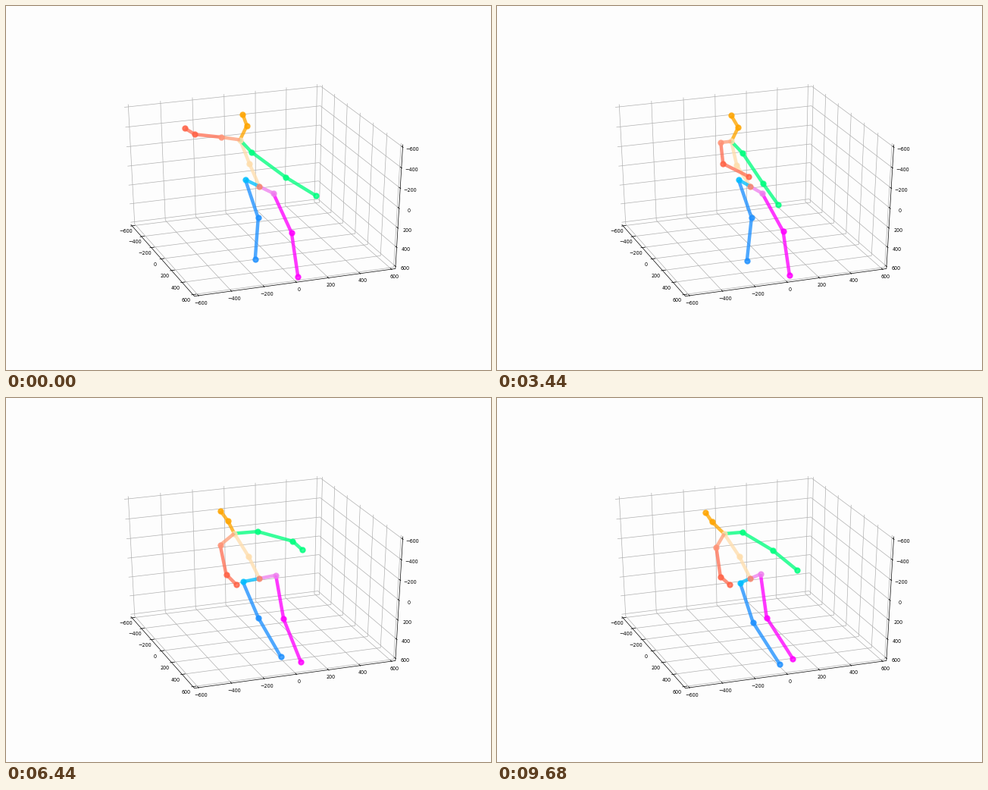
A matplotlib script for the animation above (9720 ms loop, 640 by 480 pixels).

```python
import numpy as np
import matplotlib.pyplot as plt
from matplotlib.animation import FuncAnimation
from matplotlib.collections import LineCollection

W, H = 640, 480
FRAMES, STEP = 243, 40
TICKS = range(-600, 601, 200)
EDGE = 625          # walls stand a little outside the ticks
PAD = 42            # distance of labels from their axis
ROOT = np.array([334.3, 238.0])

fig = plt.figure(figsize=(W / 100, H / 100), dpi=100, facecolor="#fdfdfd")
ax = fig.add_axes([0, 0, 1, 1])
ax.set_xlim(0, W)
ax.set_ylim(H, 0)
ax.axis("off")


# ---- room -------------------------------------------------------------

AZIM, ELEV = np.radians([-20, 30])


def project(x, y, z):
    """Perspective view of a data point, in stage pixels; z points down."""
    x, y, z = x / 1200, y / 1200, -z / 1200
    right = y * np.cos(AZIM) - x * np.sin(AZIM)
    near = x * np.cos(AZIM) + y * np.sin(AZIM)
    up = z * np.cos(ELEV) - near * np.sin(ELEV)
    dist = 10 - near * np.cos(ELEV) - z * np.sin(ELEV)
    return 334.7 + 2681 * right / dist, 238.2 - 1782 * up / dist


def path(*points):
    return [project(*p) for p in points]


def label(value, *point):
    x, y = project(*point)
    ax.text(x, y + 1, str(value).replace("-", "\u2212"), fontsize=4.7,
            family="DejaVu Sans", ha="center", va="center", color="black")


def draw_room():
    e, out, inn, far = EDGE, EDGE + 10, EDGE - 20, EDGE + PAD
    grid, marks = [], []
    for v in TICKS:
        grid += [path((v, -e, e), (v, e, e), (v, e, -e)),
                 path((e, v, e), (-e, v, e), (-e, v, -e)),
                 path((-e, -e, v), (-e, e, v), (e, e, v))]
        marks += [path((v, -out, e), (v, -inn, e)),
                  path((out, v, e), (inn, v, e)),
                  path((out, e, v), (inn, e, v))]
        label(v, v, -far, far)
        label(v, far, v, far)
        label(v, far, far, v)
    marks.append(path((-e, -e, e), (e, -e, e), (e, e, e), (e, e, -e)))
    for lines, color in ((grid, "#b0b0b0"), (marks, "black")):
        ax.add_collection(LineCollection(lines, colors=color, linewidths=0.5,
                                         zorder=1))


# ---- motion -----------------------------------------------------------

# The body turns once from its first stance to its last; the right arm
# swings in earlier. Around that, soft pulses (centre, width in s) move limbs.
TURN, SWING = (3.6, 7.4), (1.3, 3.6)
PULSES = dict(reach=(1.0, 0.8), cross=(3.4, 0.9), stride=(5.4, 1.0),
              lift=(7.4, 1.0), settle=(9.7, 0.8))


def smooth(t, start, end):
    u = np.clip((t - start) / (end - start), 0, 1)
    return u * u * (3 - 2 * u)


def bone(start, end, when=TURN, **pulses):
    """Offset of a joint from its parent as a function of time."""
    start, end = np.array(start), np.array(end)

    def offset(t):
        total = start + (end - start) * smooth(t, *when)
        for name, push in pulses.items():
            centre, width = PULSES[name]
            total = total + np.array(push) * np.exp(-((t - centre) / width) ** 2)
        return total
    return offset


hip = bone((-18.5, -9), (-20, 6.8),
           cross=(3, 0), stride=(-6, 0), settle=(6.5, -1))

# joint: parent, bone colour, dot colour, offset
SKELETON = {
    "spine": ("root", "navajowhite", "navajowhite", bone(
        (-13, -30), (-14.5, -29), cross=(-5, 2))),
    "chest": ("spine", "navajowhite", "navajowhite", bone(
        (-12.5, -31.5), (-20, -30), cross=(5.5, 0))),
    "nose": ("chest", "orange", "orange", bone(
        (9, -18.5), (-12, -16.5), settle=(-4, 1))),
    "head": ("nose", "orange", "orange", bone(
        (-5.5, -15.5), (-8.5, -12.5), cross=(-3.5, 0), stride=(-5, 0))),

    "hip_r": ("root", "deepskyblue", "deepskyblue", hip),
    "knee_r": ("hip_r", "dodgerblue", "dodgerblue", bone(
        (17, 50.5), (17, 52), stride=(10, -13))),
    "foot_r": ("knee_r", "dodgerblue", "dodgerblue", bone(
        (-4, 54), (31, 56), cross=(-2, 3), stride=(-4, -7), lift=(14, -5),
        settle=(4, -1))),

    "hip_l": ("root", "violet", "violet", lambda t: -hip(t)),
    "knee_l": ("hip_l", "magenta", "magenta", bone(
        (24, 52), (6, 59.5), cross=(3.5, -2), stride=(4, -2),
        settle=(2, -2))),
    "foot_l": ("knee_l", "magenta", "magenta", bone(
        (8.5, 58), (25.5, 55), stride=(0, 4), settle=(9, -1))),

    "shoulder_l": ("chest", "springgreen", "springgreen", bone(
        (15, 16), (31, -6), stride=(7, 0), settle=(-7, 4))),
    "elbow_l": ("shoulder_l", "springgreen", "springgreen", bone(
        (43, 33), (45, 22), reach=(9, 0), cross=(-17, 6), stride=(5, 4),
        lift=(0, -31), settle=(-5, 2))),
    "hand_l": ("elbow_l", "springgreen", "springgreen", bone(
        (37, 25), (16, 16), reach=(14, -3), cross=(-17, 3),
        lift=(-18, -16), settle=(16, 10))),

    "shoulder_r": ("chest", "lightsalmon", "#ff9478", bone(
        (-24.5, -3.5), (-17.5, 19), cross=(10.5, 5), settle=(7, -1))),
    "elbow_r": ("shoulder_r", "#ff7256", "tomato", bone(
        (-33, -3.5), (5.5, 38.5), SWING, reach=(-9, -1), cross=(-2, -10),
        lift=(6, 0))),
    "hand_r": ("elbow_r", "#ff7256", "tomato", bone(
        (-11, -8), (7, 14.5), SWING, reach=(-12, 0), cross=(27, 3),
        stride=(15, -8), lift=(3, 4), settle=(5, -4))),
}


def pose(t):
    points = {"root": ROOT}
    for name, (parent, _, _, offset) in SKELETON.items():
        points[name] = points[parent] + offset(t)
    return points


# ---- figure -----------------------------------------------------------

def make_dot(color, z):
    return ax.plot([], [], "o", color=color, ms=4.5, mew=1.5, alpha=0.8,
                   zorder=z)[0]


draw_room()
lines, dots = {}, {"root": make_dot("#f5866e", 2.6)}
for name, (_, color, dot_color, _) in SKELETON.items():
    z = 3 if name in ("shoulder_r", "elbow_r", "hand_r") else 2
    lines[name], = ax.plot([], [], color=color, lw=3.2, alpha=0.78, zorder=z,
                           solid_capstyle="butt")
    dots[name] = make_dot(dot_color, z + 0.5)


def update(i):
    points = pose(i * STEP / 1000)
    for name, line in lines.items():
        line.set_data(*zip(points[SKELETON[name][0]], points[name]))
    for name, dot in dots.items():
        x, y = points[name]
        dot.set_data([x], [y])
    return [*lines.values(), *dots.values()]


anim = FuncAnimation(fig, update, frames=FRAMES, interval=STEP, repeat=True,
                     repeat_delay=0)
plt.show()
```
